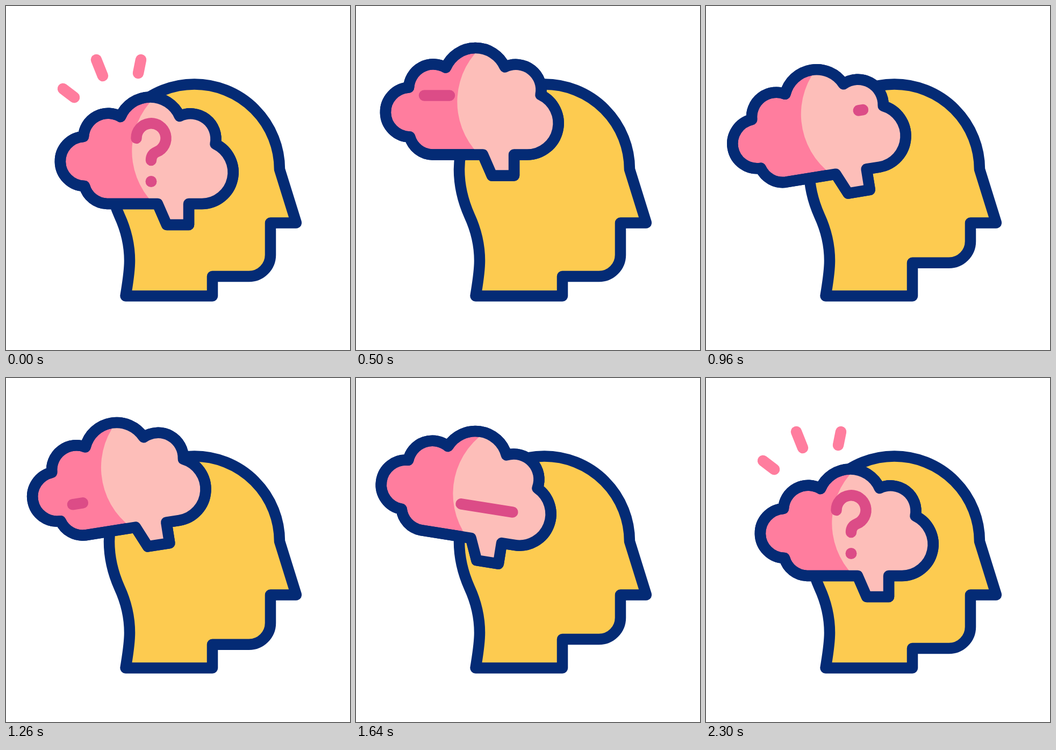
Recreate the animation shown at these times as an HTML page with a canvas. Size 640 px wide and 640 px high, loop 2.4 s.

```html
<!DOCTYPE html>
<html lang="en">
<head>
<meta charset="utf-8">
<title>Thinking head</title>
<style>
  html, body { margin: 0; width: 100%; height: 100%; overflow: hidden; background: #fff; }
  canvas { display: block; width: 640px; height: 640px; }
</style>
</head>
<body>
<canvas id="stage" width="640" height="640"></canvas>
<script>
const ctx = document.getElementById('stage').getContext('2d');
const NAVY = '#042b75', YELLOW = '#fdcb50', PINK = '#ff7d9e', BLUSH = '#fdbeb9', MAGENTA = '#dc4c87';
const LOOP = 2400, START = 200, BEAT = 400, BEATS = 5, LINE_TIME = 300;
const PIVOT = { x: 262, y: 281 };
const LIFTS = [0, 108, 49.4, 100.4, 57, 0]; // brain height at each beat

const brain = new Path2D(
  'M188 368H282L299 407H340V368H364.5A58.5 58.5 0 0 0 389.5 256.8' +
  'A47 47 0 0 0 323 205A60 60 0 0 0 213 206A46 46 0 0 0 144 243' +
  'A46.05 46.05 0 0 0 146 335A45 45 0 0 0 188 368Z');
const front = new Path2D('M288 160A139 139 0 0 0 275 368V420H440V150Z');
const question = new Path2D('M242.5 246A27.5 27.5 0 1 1 280 271.5Q270 276 270 287');
const rays = new Path2D('M127 170L106 154M180 130L168 100M246 125L251 100');

// Eased progress from 0 to 1 between two times.
function ramp(t, from, to) {
  const s = Math.min(1, Math.max(0, (t - from) / (to - from)));
  return s * s * (3 - 2 * s);
}

function liftAt(beat) {
  const i = Math.min(BEATS - 1, Math.max(0, Math.floor(beat)));
  return LIFTS[i] + (LIFTS[i + 1] - LIFTS[i]) * ramp(beat, i, i + 1);
}

function poseAt(t) {
  const beat = (t - START) / BEAT;
  const talking = beat > 1 && beat < BEATS;
  const phase = talking ? (beat - 1) % 2 * BEAT : 0;
  return {
    shift: -54.3 * (ramp(beat, 0, 1) - ramp(beat, BEATS - 1, BEATS)),
    lift: -liftAt(beat),
    jaw: -26 * (ramp(phase, 0, BEAT) - ramp(phase, BEAT, 2 * BEAT)),
    tilt: 9.4 * (ramp(phase, 0, 230) - 2 * ramp(phase, 230, 370) + ramp(phase, 640, 800)),
    idle: 1 - ramp(t, 200, 400) + ramp(t, 2000, 2300)
  };
}

function paint(path, fill, stroke) {
  ctx.fillStyle = fill;
  ctx.fill(path);
  ctx.strokeStyle = stroke;
  ctx.stroke(path);
}

// Strokes only the first part of a path.
function trim(path, length, amount, color) {
  if (amount <= 0) return;
  ctx.strokeStyle = color;
  ctx.setLineDash(amount < 1 ? [length * amount, 999] : []);
  ctx.stroke(path);
  ctx.setLineDash([]);
}

function drawHead(jaw) {
  const chin = 503 + jaw;
  const head = new Path2D(
    'M222.5 539.5C227 511 230 495 230 474C230 446 223 416 211 390' +
    'C199 363 192 335 192 304A158.5 158.5 0 0 1 509 304L540 403.5H492' +
    `V${chin - 40}A40 40 0 0 1 452 ${chin}H384V539.5Z`);
  paint(head, YELLOW, NAVY);
}

function drawQuestion(amount) {
  trim(question, 138, amount, MAGENTA);
  ctx.fillStyle = MAGENTA;
  ctx.beginPath();
  ctx.arc(270, 326.5, 10.5 * amount, 0, Math.PI * 2);
  ctx.fill();
}

function drawLine(t, y, start) {
  const left = 173, width = 178;
  const head = ramp(t, start, start + LINE_TIME);
  const tail = ramp(t, start + LINE_TIME, start + 2 * LINE_TIME);
  if (head <= tail) return;
  ctx.strokeStyle = MAGENTA;
  ctx.beginPath();
  ctx.moveTo(left + width * tail, y);
  ctx.lineTo(left + width * head, y);
  ctx.stroke();
}

function drawBrain(t, { shift, lift, tilt, idle }) {
  ctx.save();
  ctx.translate(PIVOT.x + shift, PIVOT.y + lift);
  ctx.rotate(tilt * Math.PI / 180);
  ctx.translate(-PIVOT.x, -PIVOT.y);

  paint(brain, PINK, NAVY);
  ctx.save();
  ctx.clip(brain);
  ctx.fillStyle = BLUSH;
  ctx.fill(front);
  ctx.restore();
  ctx.stroke(brain);

  drawQuestion(idle);
  for (let i = 0; i < 2; i++) drawLine(t, 258 + 50 * i, 400 + 800 * i);
  ctx.restore();
}

function render(t) {
  const pose = poseAt(t);
  ctx.fillStyle = '#fff';
  ctx.fillRect(0, 0, 640, 640);
  ctx.lineWidth = 20.5;
  ctx.lineCap = ctx.lineJoin = 'round';
  drawHead(pose.jaw);
  trim(rays, 32, pose.idle, PINK);
  drawBrain(t, pose);
}

const origin = performance.now();
function tick() {
  render((performance.now() - origin) % LOOP);
  requestAnimationFrame(tick);
}
tick();
</script>
</body>
</html>
```
